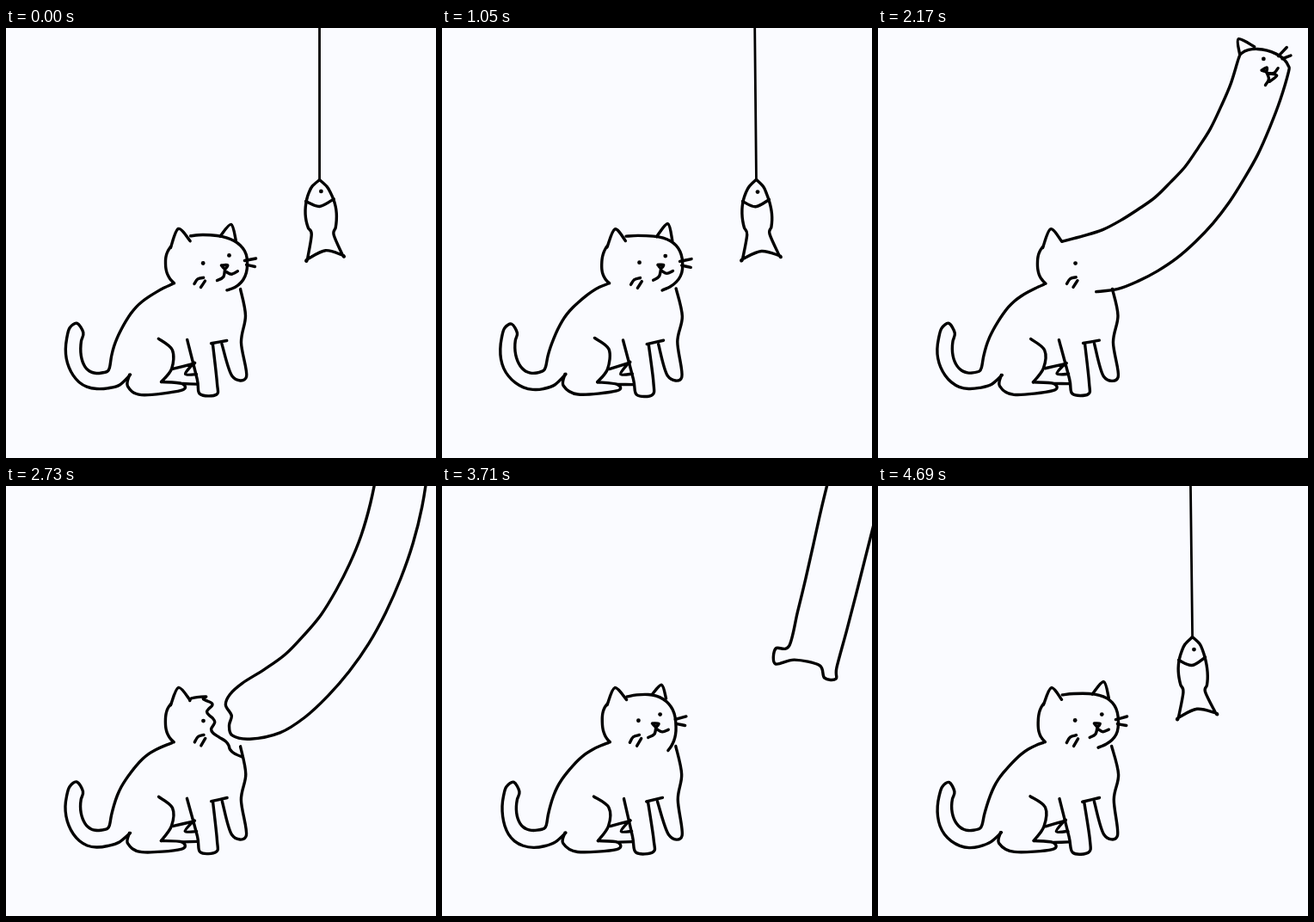
These frames come from a looping animation (500x500 px, 4760 ms). An HTML page with a canvas:

```html
<!DOCTYPE html>
<html lang="en">
<head>
<meta charset="utf-8">
<title>Cat and fish</title>
<style>
html, body { margin: 0; width: 100%; height: 100%; overflow: hidden; background: #fafbff; }
canvas { display: block; }
</style>
</head>
<body>
<canvas id="stage" width="500" height="500"></canvas>
<script>
const ctx = document.getElementById('stage').getContext('2d');
const LOOP = 4760, STEP = 70, PAPER = '#fafbff', INK = '#000';
let time = 0, seed = 0;

const clamp = v => Math.max(0, Math.min(1, v));
const ease = (from, to) => {
  const u = clamp((time - from) / (to - from));
  return u * u * (3 - 2 * u);
};
const points = text => text.split(' ').map(pair => pair.split(',').map(Number));
const samples = (from, to, n, fn) => Array.from({ length: n + 1 }, (_, i) => fn(from + (to - from) * i / n));
const shift = (pts, dx, dy) => pts.map(([x, y]) => [x + dx, y + dy]);
const morph = (a, b, k) => a.map(([x, y], i) => [x + (b[i][0] - x) * k, y + (b[i][1] - y) * k]);
const place = (pts, x, y, turn = 0) => pts.map(([a, b]) => [
  x + a * Math.cos(turn) - b * Math.sin(turn),
  y + a * Math.sin(turn) + b * Math.cos(turn)
]);

const bezier = (p, t) => [0, 1].map(i => {
  const s = 1 - t;
  return s * s * s * p[0][i] + 3 * s * s * t * p[1][i] + 3 * s * t * t * p[2][i] + t * t * t * p[3][i];
});
const trace = (p, from = 0, to = 1, n = 12) => samples(from, to, n, t => bezier(p, t));

// Hand-drawn line boil, renewed on every step
const wobble = ([x, y]) => [
  x + 0.6 * Math.sin(x * 0.09 + y * 0.05 + seed),
  y + 0.6 * Math.sin(y * 0.1 - x * 0.06 + seed * 1.7)
];

// Smooth stroke through all points; a repeated point makes a corner
function stroke(pts, width = 3.4) {
  const p = pts.map(wobble), at = i => p[Math.max(0, Math.min(p.length - 1, i))];
  ctx.lineWidth = width;
  ctx.beginPath();
  ctx.moveTo(...p[0]);
  for (let i = 0; i < p.length - 1; i++) {
    const [a, b, c, d] = [at(i - 1), at(i), at(i + 1), at(i + 2)];
    ctx.bezierCurveTo(b[0] + (c[0] - a[0]) / 6, b[1] + (c[1] - a[1]) / 6,
      c[0] - (d[0] - b[0]) / 6, c[1] - (d[1] - b[1]) / 6, ...c);
  }
  ctx.stroke();
}

function dot(pt) {
  ctx.beginPath();
  ctx.arc(...wobble(pt), 2.4, 0, 7);
  ctx.fill();
}

// The head is a slightly squared ellipse, angles in degrees
const headArc = (from, to) => samples(from, to, 12, deg => {
  const soft = v => Math.sign(v) * Math.abs(v) ** 0.8, a = deg * Math.PI / 180;
  return [233 + 47 * soft(Math.cos(a)), 274 + 33 * soft(Math.sin(a))];
});
const HEAD_FRONT = headArc(-108, 65);
const HEAD_BACK = headArc(140, 213);
const LEFT_EAR = points('192,255 201,234 214,248');
const RIGHT_EAR = points('-11,-28 2,-42 8,-23');
const EAR_STUB = points('-24,-26 -17,-30 -15,-21');
const HEAD = [260, 270];

const LIMBS = [
  '177,361 194,374 193,396 181,412',
  '181,412 204,414 203,422 158,426 141,416 143,403',
  '211,363 222,408 226,426 245,426 246,412 240,368',
  '251,367 263,405 279,406 274,365 279,335 272,303',
  '195,396 217,390 217,390 208,402 221,402', '205,414 222,414',
  '238,367 257,363', '219,298 223,292 230,290', '227,302 232,294'
].map(points);

const TAIL = points('134,402 90,428 68,390 82,352');
const BACK = points('121,394 128,345 155,312 193,298');

// Both edges of the neck, stretched and later hanging
const TOP_EDGE = points('215,248 320,228 398,140 428,0');
const LOW_EDGE = points('254,307 365,298 462,158 488,0');
const straight = (x, y, dx, dy) => samples(0, 1, 3, t => [x + dx * t, y + dy * t]);
const TOP_HANGING = straight(346, 422, 101, -422);
const LOW_HANGING = straight(398, 452, 118, -450);
const TORN_END = points('260,242 255,254 262,266 259,277 262,289 282,293');
const HANGING_END = points('350,341 350,358 373,354 401,360 407,375 421,376');
const WOUND = points('214,249 250,230 245,280 276,316');

function face(x, y, turn = 0, biting = false) {
  const line = text => stroke(place(points(text), x, y, turn));
  dot(place([[0, -5]], x, y, turn)[0]);
  line('-9,6 -2,6 -5,10 -9,6');
  line('-5,10 -7,19 -14,23');
  line('-4,13 2,16 9,13');
  line('17,1 30,-2');
  line('19,6 29,8');
  if (biting) line('-3,14 3,20 -8,22');
}

function drawFish() {
  const leave = Math.max(0, time - 1190) / 420;
  const back = 1 - ease(3990, 4480);
  const dy = time < 3990 ? -56 * leave * leave : -270 * back;
  const dx = time < 3990 ? 77 * (1 - Math.exp(dy / 90)) : -2 * back;
  if (dy < -272) return;
  const side = (dir, from, to) => samples(from, to, 8, u =>
    [365 + 3 * u * u + dir * 17.5 * Math.sin(Math.PI * 0.8 * u) ** 0.6, 176 + 64 * u]);
  const fin = points('350,269 350,269 371,259 392,264 392,264');
  stroke(shift([...side(-1, 0, 1), ...fin, ...side(1, 1, 0)], dx, dy));
  stroke(shift(points('349,202 365,208 381,199'), dx, dy));
  dot([367 + dx, 190 + dy]);
  if (dy > -176) stroke([[364 + dx, -5], [365 + dx, 176 + dy]], 2.8);
}

function drawTail() {
  const wag = time < 1120 ? 40 * Math.sin(Math.PI * time / 1120) ** 2 : 0;
  const spine = TAIL.map(([x, y], i) => [x - wag * [0, 0, 0.5, 1][i], y]);
  const edge = (dir, from, to) => samples(from, to, 10, t => {
    const [x, y] = bezier(spine, t), [nx, ny] = bezier(spine, t + 0.01);
    const r = dir * (10 - 2 * t) / Math.hypot(nx - x, ny - y);
    return [x - (ny - y) * r, y + (nx - x) * r];
  });
  const tip = [spine[3][0] + 1, spine[3][1] - 8];
  stroke([[144, 403], ...edge(-1, 0.05, 1), tip, ...edge(1, 1, 0.1), ...trace(BACK)]);
}

function drawStretch() {
  const reach = Math.min(1.3, 0.08 + 0.27 * ((time - 1190) / 420) ** 1.3);
  const top = trace(TOP_EDGE, 0, reach + 0.02), low = trace(LOW_EDGE, reach, 0);
  const a = top[12], b = low[0];
  const [x, y] = [(a[0] + b[0]) / 2, (a[1] + b[1]) / 2];
  const bulge = [0.4 * (b[1] - a[1]), 0.4 * (a[0] - b[0])];
  const cap = trace([a, ...shift([a, b], ...bulge), b], 0.1, 0.9, 6);
  const turn = -Math.max(0, reach - 0.35);
  stroke([...top, ...cap, ...low]);
  stroke(place(RIGHT_EAR, x, y, turn - 0.26));
  face(x + 3, y - 3, turn, reach > 0.2);
}

function drawHealing() {
  const grow = ease(3360, 3920), torn = 1 - ease(2800, 3200);
  const wound = samples(0, 1, 24, t => {
    const [x, y] = bezier(WOUND, t);
    return [x - torn * (14 * Math.sin(Math.PI * t * t) + 4 * Math.sin(28 * t)), y];
  });
  stroke(grow ? morph(trace(WOUND), HEAD_FRONT, grow) : wound);
  if (time > 3150) stroke(place(morph(EAR_STUB, RIGHT_EAR, grow), ...HEAD));
  if (grow > 0.6) face(HEAD[0] - 20 * (1 - grow), HEAD[1]);
}

function drawLooseNeck() {
  const swing = ease(2700, 3290), rise = clamp((time - 3290) / 670) ** 2;
  const top = trace(morph(TOP_EDGE, TOP_HANGING, swing), 1.7, 0.2, 16);
  const low = trace(morph(LOW_EDGE, LOW_HANGING, swing), 0.2, 1.7, 16);
  const end = morph(TORN_END, HANGING_END, swing);
  stroke(shift([...top, ...end, ...low], 95 * rise, -385 * rise));
}

function drawCat() {
  drawTail();
  [...LIMBS, HEAD_BACK, LEFT_EAR].forEach(part => stroke(part));
  dot([229, 273]);
  if (time > 1190 && time < 2660) drawStretch();
  else if (time >= 2660 && time < 3990) {
    drawHealing();
    drawLooseNeck();
  } else {
    stroke(HEAD_FRONT);
    stroke(place(RIGHT_EAR, ...HEAD));
    face(...HEAD);
  }
}

function frame() {
  const step = Math.floor(performance.now() % LOOP / STEP);
  time = step * STEP;
  seed = step * 2.4;
  ctx.fillStyle = PAPER;
  ctx.fillRect(0, 0, 500, 500);
  ctx.fillStyle = ctx.strokeStyle = INK;
  ctx.lineCap = ctx.lineJoin = 'round';
  drawCat();
  drawFish();
  requestAnimationFrame(frame);
}
frame();
</script>
</body>
</html>
```
